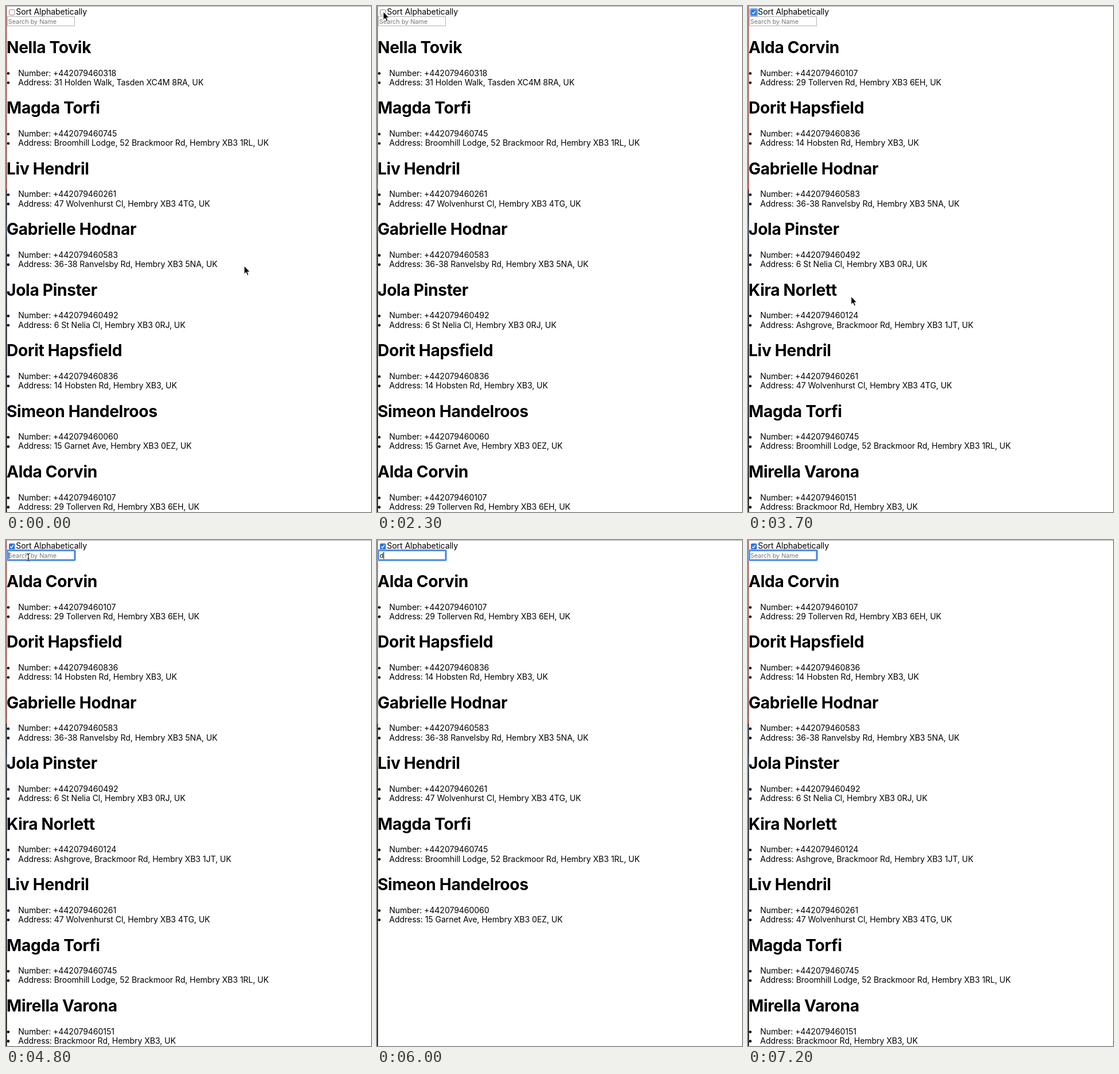
Recreate the animation shown at these times as an HTML page. Size 636 by 880 pixels, loop 7.3 s.

```html
<!DOCTYPE html>
<html lang="en">
<head>
<meta charset="utf-8">
<title>Contact list</title>
<style>
  html, body { margin: 0; width: 100%; height: 100%; overflow: hidden; background: #fff; }
  svg { display: block; width: 636px; height: 880px; }
  text { font: 14.1px Inter, Roboto, sans-serif; letter-spacing: -.006em; fill: #000; white-space: pre; }
  .name { font-size: 28.2px; font-weight: 700; letter-spacing: -.012em; }
  .field { font-size: 10.8px; letter-spacing: 0; }
  .hint { fill: #777; }
</style>
</head>
<body>
<svg viewBox="0 0 636 880">
  <defs>
    <linearGradient id="edge" x1="0" y1="0" x2="0" y2="1">
      <stop offset="0" stop-color="#a56c66"/>
      <stop offset=".2" stop-color="#a0665f"/>
      <stop offset=".35" stop-color="#7c4c4c"/>
      <stop offset=".354" stop-color="#c04a30"/>
      <stop offset=".361" stop-color="#b0442e"/>
      <stop offset=".365" stop-color="#1c1c2c"/>
      <stop offset=".42" stop-color="#1b2236"/>
      <stop offset=".44" stop-color="#33486a"/>
      <stop offset=".46" stop-color="#151a2a"/>
      <stop offset=".55" stop-color="#10121c"/>
      <stop offset="1" stop-color="#050507"/>
    </linearGradient>
  </defs>
  <rect width="636" height="880" fill="#fff"/>
  <rect width="1.6" height="880" fill="url(#edge)"/>
  <rect width="636" height="1" fill="#a6a6a6"/>

  <rect id="boxRing" x="2.2" y="3.2" width="15.6" height="15.6" rx="4" fill="#8db8f8"/>
  <rect id="boxOff" x="5.5" y="6.5" width="9.5" height="9.5" rx="1.8" fill="#fff" stroke="#858585"/>
  <g id="boxOn">
    <rect x="5" y="6" width="10.4" height="10.4" rx="2" fill="#3074e0"/>
    <path d="M7.4 11.4l2 2.2 3.6-5" fill="none" stroke="#fff" stroke-width="1.5"/>
  </g>
  <text x="17.3" y="14.5">Sort Alphabetically</text>

  <rect id="plain" x="2.5" y="18.5" width="117" height="16" fill="#fff" stroke="#b4b4b4"/>
  <g id="focus">
    <rect x="2" y="18" width="118" height="17" rx="1.5" fill="#fff" stroke="#a3c5f8" stroke-width="4"/>
    <rect x="2" y="18" width="118" height="17" rx="1.5" fill="none" stroke="#4884e4" stroke-width="2.2"/>
  </g>
  <text id="hint" class="field hint" x="3.8" y="30.6">Search by Name</text>
  <text id="typed" class="field" x="4.6" y="30.6"></text>
  <rect id="caret" y="21" width="1" height="12"/>

  <g id="list"></g>

  <path id="arrow" d="M0 0V14.2L3.2 11.2 5.5 16.4 7.8 15.4 5.6 10.4H10Z" stroke="#fff" stroke-width="1"/>
  <g id="beam" fill="none">
    <path d="M-3-6.5Q0-6.5 0-4.5Q0-6.5 3-6.5M0-5V5M-3 6.5Q0 6.5 0 4.5Q0 6.5 3 6.5M-1.5 2H1.5" stroke="#fff" stroke-width="2.4"/>
    <path d="M-3-6.5Q0-6.5 0-4.5Q0-6.5 3-6.5M0-5V5M-3 6.5Q0 6.5 0 4.5Q0 6.5 3 6.5M-1.5 2H1.5" stroke="#000"/>
  </g>
</svg>
<script>
const LOOP = 7300, STEP = 100, PITCH = 105.45;
const $ = id => document.getElementById(id);

const people = [
  ['Nella Tovik', '318', '31 Holden Walk, Tasden XC4M 8RA, UK'],
  ['Magda Torfi', '745', 'Broomhill Lodge, 52 Brackmoor Rd, Hembry XB3 1RL, UK'],
  ['Liv Hendril', '261', '47 Wolvenhurst Cl, Hembry XB3 4TG, UK'],
  ['Gabrielle Hodnar', '583', '36-38 Ranvelsby Rd, Hembry XB3 5NA, UK'],
  ['Jola Pinster', '492', '6 St Nelia Cl, Hembry XB3 0RJ, UK'],
  ['Dorit Hapsfield', '836', '14 Hobsten Rd, Hembry XB3, UK'],
  ['Simeon Handelroos', '060', '15 Garnet Ave, Hembry XB3 0EZ, UK'],
  ['Alda Corvin', '107', '29 Tollerven Rd, Hembry XB3 6EH, UK'],
  ['Kira Norlett', '124', 'Ashgrove, Brackmoor Rd, Hembry XB3 1JT, UK'],
  ['Mirella Varona', '151', 'Brackmoor Rd, Hembry XB3, UK']
];
const sortedPeople = [...people].sort((a, b) => a[0] < b[0] ? -1 : 1);

// [time, x, y] of the pointer
const path = [
  [0, 415, 452], [200, 415, 452], [600, 287, 159], [800, 287, 159],
  [1100, 91, 51], [1300, 90, 49], [1400, 90, 49], [1700, 218, 701],
  [2100, 12, 12], [2300, 11, 10], [2900, 11, 10], [3500, 188, 533],
  [3600, 188, 533], [4300, 39, 30], [LOOP, 39, 30]
];
const typing = [[0, ''], [4900, 'd'], [5100, 'do'], [5500, 'dor'], [5900, 'do'], [6000, 'd'], [6400, '']];

const SORT = 2900, BEAM = 4200, FOCUS = 4700, TYPE = 4900;
const between = (t, a, b) => t >= a && t < b;
const show = (id, on) => $(id).setAttribute('visibility', on ? 'visible' : 'hidden');

function pointer(t) {
  const i = path.findIndex(p => p[0] > t);
  const [t0, x0, y0] = path[i - 1], [t1, x1, y1] = path[i];
  const k = (t - t0) / (t1 - t0), e = k * k * (3 - 2 * k);
  return [x0 + (x1 - x0) * e, y0 + (y1 - y0) * e];
}

function card([name, number, address], i) {
  const y = i * PITCH;
  const row = (dy, label) =>
    `<circle cx="4" cy="${y + dy - 4.2}" r="2.3"/><text x="21.3" y="${Math.round(y + dy)}">${label}</text>`;
  return `<text class="name" x="1" y="${Math.round(y + 82)}">${name}</text>` +
    row(121.5, 'Number: +442079460' + number) + row(137.7, 'Address: ' + address);
}

let shown = null;
function renderList(sorted, query) {
  const key = sorted + query;
  if (key === shown) return;
  shown = key;
  $('list').innerHTML = (sorted ? sortedPeople : people)
    .filter(p => p[0].toLowerCase().includes(query))
    .slice(0, 8).map(card).join('');
}

function draw(t) {
  const query = typing.filter(k => k[0] <= t).pop()[1];
  const sorted = t >= SORT, focused = t >= FOCUS;
  renderList(sorted, query);

  show('boxOff', !sorted);
  show('boxOn', sorted);
  show('boxRing', between(t, SORT, FOCUS));
  show('plain', !focused);
  show('focus', focused);
  show('hint', !query);
  $('typed').textContent = query;
  $('caret').setAttribute('x', 4.6 + (query ? $('typed').getComputedTextLength() : 0));
  show('caret', between(t, FOCUS, 6200) || between(t, 6400, 7000));

  const [x, y] = pointer(t);
  for (const id of ['arrow', 'beam']) $(id).setAttribute('transform', `translate(${x} ${y})`);
  show('arrow', t < BEAM);
  show('beam', between(t, BEAM, TYPE));
}

function tick() {
  const t = performance.now() % LOOP;
  draw(Math.floor(t / STEP) * STEP);
  requestAnimationFrame(tick);
}
tick();
</script>
</body>
</html>
```
